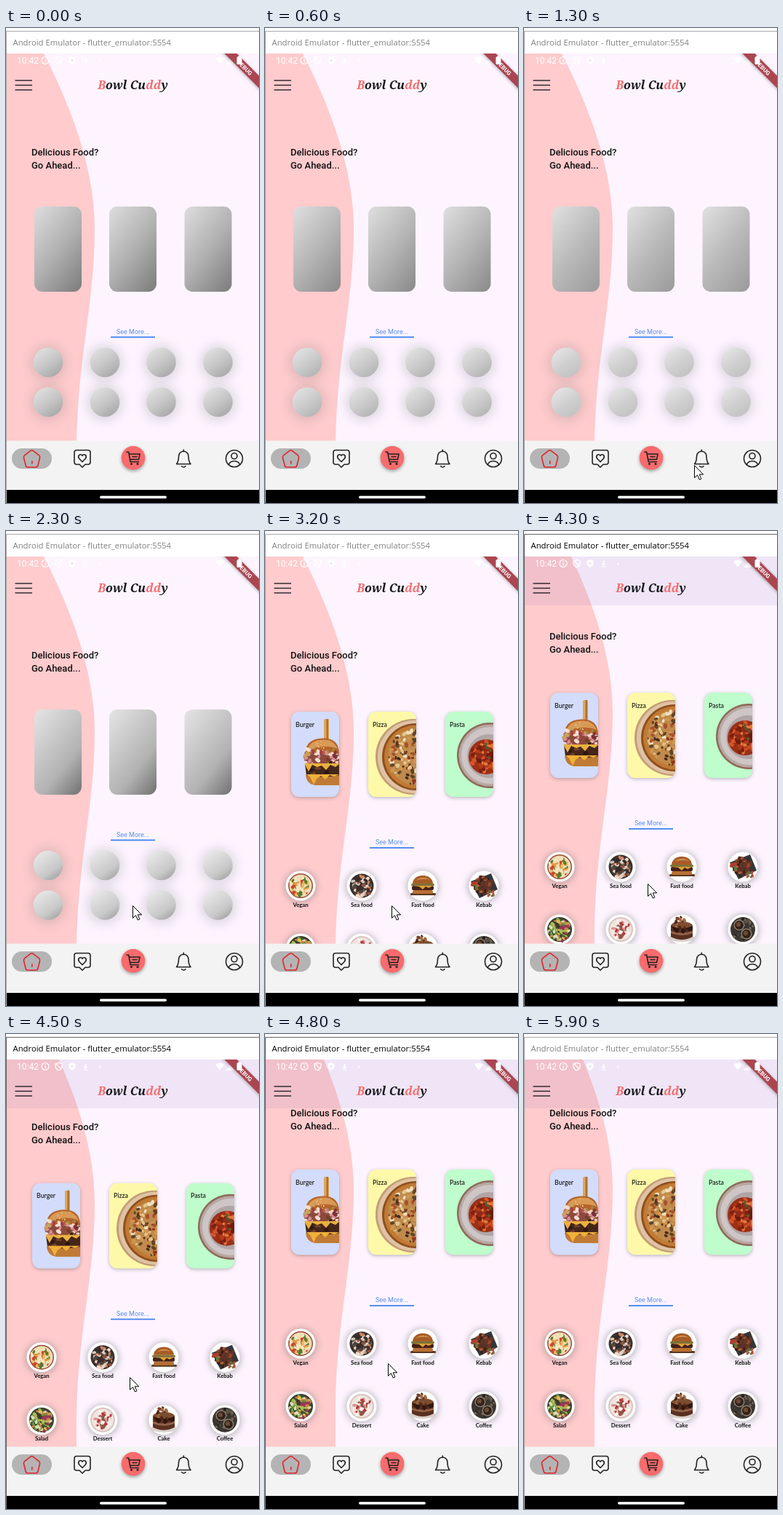
An HTML page for the animation above (6000 ms loop, 348x652 px).

```html
<!DOCTYPE html>
<html lang="en">
<head>
<meta charset="utf-8">
<title>Food app</title>
<style>
html, body { margin: 0; width: 100%; height: 100%; overflow: hidden; background: #fff; }
svg { display: block; width: 348px; height: 652px; }
.title { font: 11.3px "Open Sans", sans-serif; }
.head { font: 500 13px Roboto, sans-serif; fill: #111; }
.more { font: 9px Roboto, sans-serif; fill: #5c93ee; }
.card { font: 500 8.8px Lato, sans-serif; fill: #111; }
.label { font: 700 7.7px Lato, sans-serif; fill: #111; text-anchor: middle; }
.brand { font: italic 800 16px "Noto Serif", serif; fill: #17171b; text-anchor: middle; }
.brand .hot { fill: #f36f6f; }
.clock { font: 12px Roboto, sans-serif; fill: #fff; }
.debug { font: 700 8px Roboto, sans-serif; fill: #fff; text-anchor: middle; }
.line { fill: none; stroke: #222; stroke-width: 1.6; stroke-linecap: round; stroke-linejoin: round; }
</style>
</head>
<body>
<svg id="stage" viewBox="0 0 348 652" xmlns="http://www.w3.org/2000/svg"></svg>
<script>
const LOOP = 6000, STEP = 100, READY = 2900, FOCUS = 3600, BLUR = 5900;

const circle = (x, y, r, fill, extra = '') => `<circle cx="${x}" cy="${y}" r="${r}" fill="${fill}" ${extra}/>`;
const oval = (x, y, rx, ry, fill, extra = '') => `<ellipse cx="${x}" cy="${y}" rx="${rx}" ry="${ry}" fill="${fill}" ${extra}/>`;
const rect = (x, y, w, h, fill, r = 0, extra = '') => `<rect x="${x}" y="${y}" width="${w}" height="${h}" rx="${r}" fill="${fill}" ${extra}/>`;
const path = (d, fill, extra = '') => `<path d="${d}" fill="${fill}" ${extra}/>`;
const stroke = (d, extra = '') => `<path class="line" d="${d}" ${extra}/>`;
const text = (x, y, cls, s) => `<text x="${x}" y="${y}" class="${cls}">${s}</text>`;
const at = (x, y, body) => `<g transform="translate(${x} ${y})">${body}</g>`;

function random(seed) {
  return () => (seed = (seed * 16807) % 2147483647) / 2147483647;
}

// Scatters small ovals over a disc.
function bits(seed, cx, cy, radius, count, size, colors) {
  const next = random(seed * 7919);
  let out = '';
  for (let i = 0; i < count; i++) {
    const a = next() * 6.283, d = Math.sqrt(next()) * radius;
    const s = size * (0.6 + next() * 0.7);
    const x = (cx + d * Math.cos(a)).toFixed(1), y = (cy + d * Math.sin(a)).toFixed(1);
    out += oval(x, y, s.toFixed(1), (s * 0.65).toFixed(1), colors[i % colors.length],
      `transform="rotate(${(next() * 180) | 0} ${x} ${y})"`);
  }
  return out;
}

function burger() {
  return rect(45, 10, 7, 30, '#dda65b', 2) + rect(48.5, 10, 2.5, 30, '#b0712f')
    + path('M20 58C19 44 28 37 43 36.500S66 43 66 58Z', '#b4642a')
    + path('M22 53C25 42 34 38.500 44 38.500S61 43 64 51C52 46 36 47 22 53Z', '#d99a56')
    + bits(4, 43, 44, 12, 14, 0.9, ['#f2d7a2'])
    + path('M17 63Q27 55 43 58T68 58V74H21Z', '#8d4a3c')
    + bits(9, 32, 63, 14, 26, 3.2, ['#d98f97', '#f3ded0', '#a2404d', '#c7a25c'])
    + bits(14, 54, 63, 12, 20, 3.2, ['#d98f97', '#f0d6c4', '#7d3036', '#90924c'])
    + path('M19 72H67V89Q43 94 21 88Z', '#46261a')
    + bits(7, 44, 80, 18, 14, 3, ['#744027', '#2e1711'])
    + path('M18 71H67L61 76 54 73 48 80 42 74 36 76 29 73 24 82Z', '#e9b13f')
    + path('M20 87Q44 92 67 87V101H33Q21 99 20 87Z', '#c07a36')
    + path('M21 86H66L59 89 53 87 47 93 41 88 35 92 31 100 26 90Z', '#efb03a');
}

function pizza() {
  return circle(62, 62, 52, '#c29c78') + circle(63, 62, 50, '#dfc3a4')
    + circle(65, 62, 46, '#8f4f20') + circle(65.5, 62, 43.5, '#c27a33') + circle(66, 62, 39, '#c08a4c')
    + bits(15, 66, 62, 38, 200, 2.9, ['#e6c68c', '#8c3420', '#cf9850', '#45291c', '#f0e0bf', '#a8512a', '#5f4428']);
}

function pasta() {
  return circle(61, 60, 45, '#8d6a5a') + circle(61, 60, 42.5, '#b9a8a2')
    + circle(61, 60, 39, '#cdc5c6') + circle(60, 61, 30, '#b1a5a6')
    + circle(56, 62, 24, '#9c2f16')
    + bits(23, 55, 62, 21, 80, 3.6, ['#d4552a', '#7c2010', '#e2793d', '#b33a1a'])
    + bits(6, 54, 58, 12, 8, 4.5, ['#6e1c10', '#8f2b18']) + bits(12, 56, 54, 10, 4, 2.5, ['#50602c']);
}

const dishes = {
  Vegan: () => circle(0, 0, 17, '#9a4a35') + circle(0, 0, 15.5, '#ecdcb8')
    + bits(31, -1, 1, 13, 60, 3, ['#e39a45', '#557a2c', '#f5e6bd', '#c9482c', '#e8bd62', '#f2dfb6']),
  'Sea food': () => circle(0, 0, 16.5, '#3a302d')
    + bits(42, 0, 1, 14, 60, 2.8, ['#eed9ca', '#c98562', '#332b29', '#d4c6b8', '#8f5541', '#4c4640']),
  'Fast food': () => rect(-17, 10, 35, 3, '#5b3822', 1.5) + path('M-14 -3C-13 -18 13 -18 14 -3Z', '#a85c27')
    + path('M-10 -7Q0 -15 10 -8 0 -11 -10 -7Z', '#d4924f')
    + rect(-16, -3, 32, 3, '#7d7336', 1.5) + rect(-15, 0, 30, 6, '#45221a', 2)
    + path('M-14 0H14L8 3 4 1 0 5-5 1Z', '#dfa038') + rect(-14, 6, 28, 5, '#b86f33', 2.5),
  Kebab: () => path('M-18 -6L10 -17 19 5-6 17Z', '#343638')
    + [-8, -2, 4, 10].map(x => rect(x - 4, -12 + x / 3, 4.5, 22, '#6a3422', 2, `transform="rotate(24 ${x} 0)"`)).join('')
    + bits(18, 0, 0, 13, 26, 2.2, ['#94492c', '#36201b', '#b06038', '#54302a'])
    + bits(11, -12, -1, 5, 9, 2.6, ['#b5382c', '#5c7c38', '#cf5a3a']) + bits(5, 9, 10, 5, 6, 2.3, ['#4f7438', '#c04832']),
  Salad: () => circle(0, 0, 17, '#3e3d2b')
    + bits(53, 0, 0, 15, 80, 2.9, ['#67943b', '#a6bd58', '#9b3557', '#e0bc4d', '#385f2c', '#d0824b', '#d7dfb2']),
  Dessert: () => circle(0, 0, 17, '#d8c4be') + circle(0, 0, 15, '#f0e4df')
    + bits(64, 0, 0, 13, 50, 3, ['#b5373c', '#fff6f0', '#d9928b', '#f8e3dc', '#8f5546', '#f4ebe6']),
  Cake: () => oval(0, 12, 18, 5, '#d8d0cc') + path('M-15 -5V10Q0 18 15 10V-5Z', '#5a3020')
    + path('M-15 2Q0 8 15 2V5Q0 11 -15 5Z', '#94634a') + oval(0, -5, 15, 6, '#7d4d30')
    + path('M-15 -5Q0 2 15 -5V0L11 3 7 0 2 6-3 1-7 5-11 1Z', '#32180f')
    + bits(9, 0, -8, 9, 16, 2.6, ['#4c2718', '#a36b43', '#79402a']),
  Coffee: () => circle(0, 0, 17, '#3b3632') + bits(25, 0, 0, 15, 40, 2, ['#5d5248', '#242220', '#776756'])
    + [[-5, -6], [5, 6]].map(([x, y]) => circle(x, y, 7.5, '#8d7d6b') + circle(x, y, 6, '#2f211b')
      + circle(x - 1, y - 1, 3.2, '#6b4a33')).join('')
};

function skeleton() {
  let out = '';
  for (const y of [459, 513.5])
    for (const x of [58, 136, 213.5, 291.5])
      out += circle(x, y + 1, 26, '#777', 'opacity=".2" filter="url(#glow)"') + circle(x, y, 20.3, 'url(#dot)');
  for (const x of [39, 142, 245.5]) out += rect(x, 245, 65, 117, 'url(#bone)', 11);
  return out + seeMore(419.5);
}

function seeMore(y) {
  return text(152, y, 'more', 'See More...') + rect(144, y + 4, 61, 1.7, '#3a7df0');
}

function content() {
  const cards = [['Burger', '#d3dcfb', burger], ['Pizza', '#fef9a8', pizza], ['Pasta', '#bffdcc', pasta]];
  let out = '';
  cards.forEach(([name, color, draw], i) => {
    out += at(36 + i * 106, 248, rect(0, 1.5, 66, 117, '#555', 11, 'opacity=".4" filter="url(#lift)"')
      + rect(0, 0, 66, 117, color, 11)
      + `<g clip-path="url(#cardClip)">${draw()}</g>` + text(6, 20.5, 'card', name));
  });
  Object.keys(dishes).forEach((name, i) => {
    out += at(49 + (i % 4) * 84, 487 + 86 * (i >> 2),
      circle(0, 1, 23, '#777', 'opacity=".42" filter="url(#mid)"') + circle(0, 0, 20.5, '#fff')
      + dishes[name]() + text(0, 28.7, 'label', name));
  });
  return out + seeMore(430);
}

function statusBar() {
  const thin = 'stroke="#fff" stroke-width="1.2"';
  return text(15, 49, 'clock', '10:42')
    + circle(54, 44.5, 5, 'none', thin) + rect(53.4, 43.6, 1.3, 4, '#fff') + rect(53.4, 41.4, 1.3, 1.3, '#fff')
    + path('M72.500 39.500L77 41V45Q76 48.500 72.500 50 69 48.500 68 45V41Z', 'none', thin)
    + path('M69 41L76 48', 'none', thin)
    + path('M91 39L95.500 41V45Q95 48 91 50 87 48 86.500 45V41Z', '#fff') + circle(91, 44.5, 1.6, '#eadff0')
    + path('M108.500 41H110.500V45H112.500L109.500 48 106.500 45H108.500Z', '#fff') + rect(106.5, 48.5, 6, 1, '#fff')
    + circle(129, 45, 1.2, '#fff')
    + path('M288 42Q294 37.500 300 42L294 49.500Z', '#fff')
    + path('M312 39V50H302Z', '#fff');
}

function banner() {
  return `<g transform="translate(328.500 54.500) rotate(45)">`
    + rect(-50, -5, 100, 12, '#000', 0, 'opacity=".3" filter="url(#soft)"')
    + rect(-50, -6, 100, 12, '#ab4650') + text(0, 2.9, 'debug', 'DEBUG') + '</g>'
    + rect(317.5, 39.5, 7, 10.5, '#fff', 1.2) + rect(319.4, 38.3, 3.2, 2, '#fff');
}

function navBar() {
  const home = 'M33.800 580.200Q35.500 579 37.200 580.200L45.500 586.600Q47 588 46.500 590L43.900 600.500Q43.300 602.800 41 602.800H30Q27.700 602.800 27.100 600.500L24.500 590Q24 588 25.500 586.600Z';
  return rect(1, 566.5, 347, 68, '#f3f3f4') + rect(1, 634, 347, 18, '#000') + rect(129, 642.2, 92, 3.6, '#fff', 1.8)
    + rect(8, 577, 55, 28, '#b5b4b5', 14) + stroke(home, 'style="stroke:#e0252e"')
    + stroke('M35.800 594.500V598', 'style="stroke:#e0252e"')
    + stroke('M97 579.500H113Q116 579.500 116 582.500V596Q116 599 113 599H109L105 603 101 599H97Q94 599 94 596V582.500Q94 579.500 97 579.500Z')
    + stroke('M105 595.500L100.600 591Q98.800 588.500 100.500 586.300 103 584.300 105 587 107 584.300 109.500 586.300 111.200 588.500 109.400 591Z')
    + circle(175, 592, 16.5, '#555', 'opacity=".5" filter="url(#soft)"') + circle(175, 590, 16.3, '#f96b6c')
    + stroke('M166 582H168.700L171.200 595.500H182.500M169.400 584.800H184L182.500 592.300H170.700M174 588.500H180')
    + circle(172.5, 598.3, 1.5, '#222') + circle(181, 598.3, 1.5, '#222')
    + stroke('M234.500 598.500Q237.500 595 237.500 588 238 581.500 244.300 581 250.600 581.500 251 588 251 595 254 598.500ZM244.300 581V579M241.500 601.500Q244.300 604 247 601.500')
    + circle(314, 591, 11.5, 'none', 'stroke="#222" stroke-width="1.6"')
    + circle(314, 587.5, 4, 'none', 'stroke="#222" stroke-width="1.6"')
    + stroke('M306.500 599Q308.500 594.500 314 594.500T321.500 599');
}

const gradient = (id, n) => `<linearGradient id="${id}" x1=".15" y1="0" x2=".85" y2="1">${'<stop/>'.repeat(n)}</linearGradient>`;
const blur = (id, s) => `<filter id="${id}" x="-60%" y="-60%" width="220%" height="220%"><feGaussianBlur stdDeviation="${s}"/></filter>`;

const stage = document.getElementById('stage');
stage.innerHTML = `<defs>${gradient('bone', 3)}${gradient('dot', 3)}
  ${blur('soft', 2)}${blur('lift', 2.6)}${blur('mid', 4.2)}${blur('glow', 7)}
  <clipPath id="body"><rect id="bodyTop" x="1" y="35" width="347" height="532"/></clipPath>
  <clipPath id="screen"><rect x="1" y="35" width="347" height="532"/></clipPath>
  <clipPath id="cardClip"><rect width="66" height="117" rx="11"/></clipPath></defs>`
  + rect(0, 0, 348, 652, '#fff')
  + `<g clip-path="url(#screen)">` + rect(1, 35, 347, 532, '#fdf4ff')
  + `<g id="wave">` + path('M0 35H52C85 100 122 187 122 275C122 380 97 460 97 580V640H0Z', '#ffcbcd') + '</g></g>'
  + `<g clip-path="url(#body)"><g id="list">` + text(35, 175.3, 'head', 'Delicious Food?') + text(35, 193.3, 'head', 'Go Ahead...')
  + `<g id="bones">${skeleton()}</g><g id="food">${content()}</g></g></g>`
  + rect(1, 35, 347, 67, 'rgb(103,80,164)', 0, 'id="tint" opacity=".09"')
  + `<g clip-path="url(#screen)">${statusBar()}${banner()}</g>`
  + [72, 78.5, 85].map(y => rect(12.5, y - 0.7, 23.5, 1.4, '#26222a')).join('')
  + `<text class="brand" x="174.500" y="84"><tspan class="hot">B</tspan>owl Cu<tspan class="hot">dd</tspan>y</text>`
  + navBar()
  + `<path id="frame" d="M.5 652V4.500H348" fill="none"/>`
  + `<text id="title" class="title" x="9.500" y="24">Android Emulator - flutter_emulator:5554</text>`
  + `<path id="arrow" d="M.5 .5V17.300L4.500 13.700 7.300 20 9.900 18.900 7.200 12.800H12.700Z" fill="#fff" stroke="#000"/>`;

const [wave, list, bones, food, tint, frame, title, arrow, bodyTop] =
  ['wave', 'list', 'bones', 'food', 'tint', 'frame', 'title', 'arrow', 'bodyTop'].map(id => document.getElementById(id));

// Each key is [time, value, value, ...]; values between keys are linear.
function track(keys, t) {
  let i = 0;
  while (i < keys.length - 2 && t >= keys[i + 1][0]) i++;
  const [a, b] = [keys[i], keys[i + 1]];
  const p = Math.min(1, Math.max(0, (t - a[0]) / (b[0] - a[0])));
  return a.slice(1).map((v, k) => v + (b[k + 1] - v) * p);
}

const pointer = [[900, 282, 664], [1100, 256, 634], [1300, 234, 600], [1600, 208, 561], [2000, 174, 514], [3600, 174, 514],
  [4300, 170, 484], [4800, 169, 452], [5000, 169, 452], [5600, 204, 660]];
const scroll = [[3700, 0], [3900, 2], [4300, 26], [4600, 52], [4800, 62]];
// Grey levels of the first, middle and last stop, then the middle offset.
const shine = [[0, 216, 176, 130, 0.52], [1300, 220, 186, 158, 0.5], [2300, 224, 178, 124, 0.68], [2900, 218, 180, 136, 0.55]];

function setStops(id, levels, middle) {
  document.querySelectorAll(`#${id} stop`).forEach((stop, i) => {
    const v = Math.round(levels[i]);
    stop.setAttribute('offset', [0, middle, 1][i]);
    stop.setAttribute('stop-color', `rgb(${v},${v},${v})`);
  });
}

const show = (el, on) => el.setAttribute('visibility', on ? 'visible' : 'hidden');
const move = (el, x, y) => el.setAttribute('transform', `translate(${x} ${y})`);

function draw(t) {
  const [a, b, c, middle] = track(shine, t);
  setStops('bone', [a, b, c], middle);
  setStops('dot', [a + 10, b + 22, c + 34], middle);

  const [offset] = track(scroll, t);
  move(wave, 0, -offset);
  move(list, 0, -offset);
  const top = offset > 0 ? 102 : 35;
  bodyTop.setAttribute('y', top);
  bodyTop.setAttribute('height', 567 - top);
  show(tint, offset > 0);
  show(bones, t < READY);
  show(food, t >= READY);

  const focused = t >= FOCUS && t < BLUR;
  title.setAttribute('fill', focused ? '#000' : '#808080');
  frame.setAttribute('stroke', focused ? '#666' : '#aaa');

  const [x, y] = track(pointer, t);
  move(arrow, Math.round(x), Math.round(y));
}

const start = performance.now();
function tick() {
  const t = (performance.now() - start) % LOOP;
  draw(Math.floor(t / STEP) * STEP);
  requestAnimationFrame(tick);
}
tick();
</script>
</body>
</html>
```
